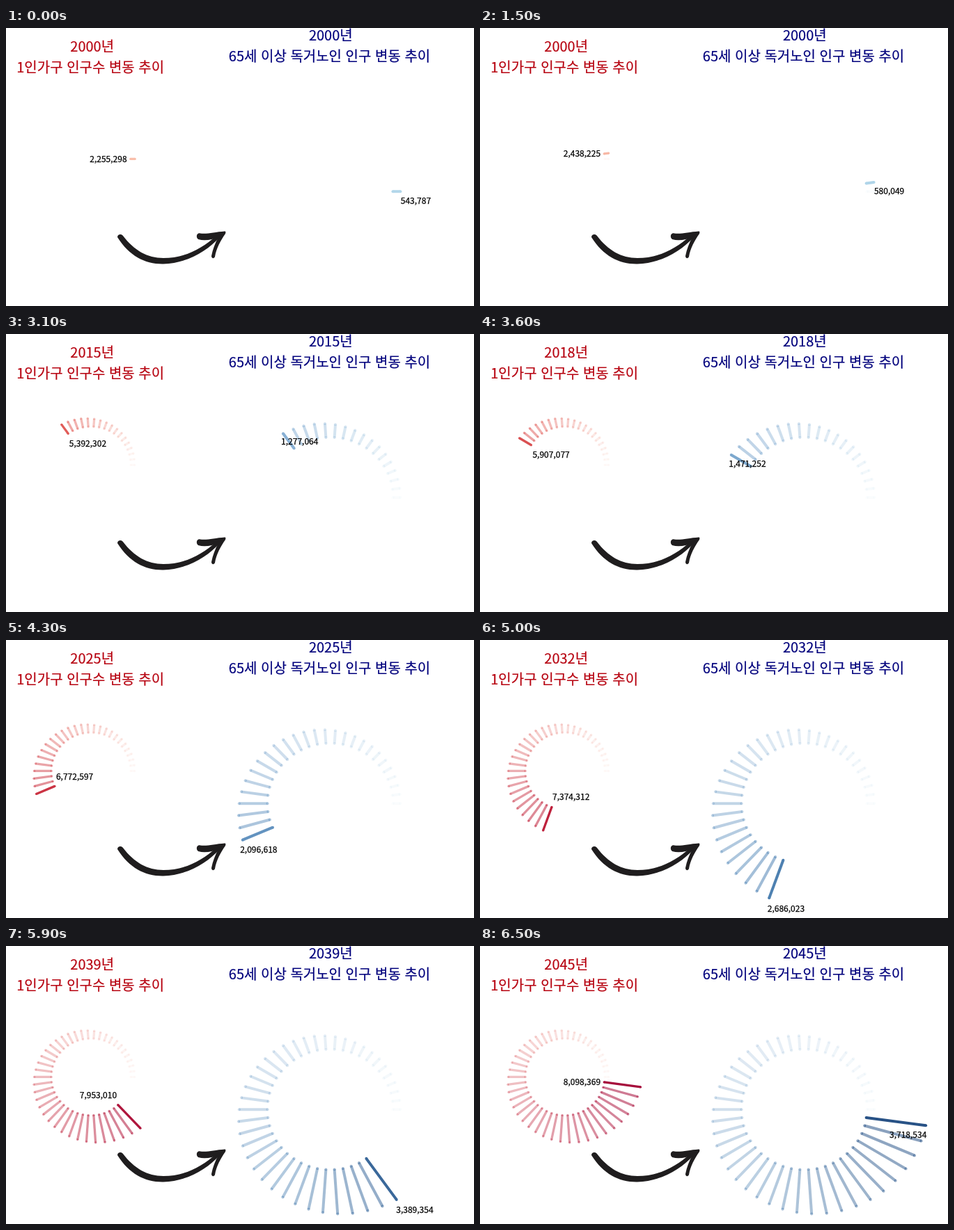
An HTML page for the animation above (8 s loop, 672x400 px).

```html
<!DOCTYPE html>
<html lang="ko">
<head>
<meta charset="utf-8">
<style>
html, body { margin: 0; width: 100%; height: 100%; overflow: hidden; background: #fff; }
svg { display: block; width: 672px; height: 400px; }
text {
  font-family: "Noto Sans CJK KR", "Noto Sans KR", "Noto Sans CJK JP", "Noto Sans CJK SC",
    "Noto Sans CJK TC", "Noto Sans CJK HK", "Noto Sans CJK", "Noto Sans", sans-serif;
}
.title { font-size: 20px; text-anchor: middle; stroke-width: 0.2px; }
.value { font-size: 12px; fill: #000; stroke: #000; stroke-width: 0.25px; }
</style>
</head>
<body>
<svg viewBox="0 0 672 400">
  <g class="title" fill="#b70411" stroke="#b70411">
    <text class="year" x="123.7" y="34">2000년</text>
    <text x="121.2" y="63.5">1인가구 인구수 변동 추이</text>
  </g>
  <g class="title" fill="#00007c" stroke="#00007c">
    <text class="year" x="466.3" y="18">2000년</text>
    <text x="464.5" y="48">65세 이상 독거노인 인구 변동 추이</text>
  </g>
  <g id="charts"></g>
  <g fill="#1f1d1e">
    <path d="M160,301 C177,328 200,340 226,339.5 C258,338.5 287,323 308,300 L303,298 C280,319 255,331 226,331 C203,331 184,320 168,299 C165,295.5 160,297 160,301Z"/>
    <path d="M314,292.5 C300,293.5 288,297 279,295.5 C274,294 272,301 276,304 C286,307 297,304 305,301 C300,310 297,318 295,328 C295,332 299,332 300,329 C302,317 308,306 315,296 C316,293 315,292 314,292.5Z"/>
  </g>
  <g id="labels"></g>
</svg>
<script>
const NS = "http://www.w3.org/2000/svg";
const COUNT = 46, LOOP = 8000, HOLD = 1500, TICK = 100, LAST = 51;
const pauses = [5, 19, 21, 36, 41, 51]; // ticks on which the bars wait for the year

function add(parent, tag, attrs = {}) {
  const el = document.createElementNS(NS, tag);
  set(el, attrs);
  return parent.appendChild(el);
}

function set(el, attrs) {
  for (const key in attrs) el.setAttribute(key, attrs[key]);
}

// Smooth curve through [x, y] points.
function curve(pts, x) {
  const last = pts.length - 1;
  let i = 0;
  while (i < last - 1 && x > pts[i + 1][0]) i++;
  const slope = n => {
    const a = pts[Math.max(0, n - 1)], b = pts[Math.min(last, n + 1)];
    return (b[1] - a[1]) / (b[0] - a[0]);
  };
  const [x0, y0] = pts[i], [x1, y1] = pts[i + 1];
  const w = x1 - x0, u = (x - x0) / w, v = 1 - u;
  return y0 * (1 + 2 * u) * v * v + slope(i) * w * u * v * v +
         y1 * u * u * (3 - 2 * u) - slope(i + 1) * w * u * u * v;
}

// Colour at u (0 to 1) along evenly spaced hex stops.
function blend(stops, u) {
  const pos = u * (stops.length - 1), i = Math.min(stops.length - 2, Math.floor(pos));
  const channel = (hex, n) => parseInt(hex.slice(1 + 2 * n, 3 + 2 * n), 16);
  return `rgb(${[0, 1, 2].map(n => {
    const a = channel(stops[i], n), b = channel(stops[i + 1], n);
    return Math.round(a + (b - a) * (pos - i));
  })})`;
}

// Bars grow slowly at first, then almost evenly.
const growth = u => u - 0.95 * u * (1 - u) ** 2;

const single = {
  cx: 122, cy: 188.4, stretch: 1.03, width: 3.3, inner: 53.5, first: 63, final: 108,
  values: [[0, 2255298], [1, 2438225], [10, 4174073], [19, 5907077], [32, 7374312], [40, 7953010], [45, 8098369]],
  colors: ["#f9beaa", "#e3605a", "#c2243c", "#a60e3c"],
  // Inside the ring, next to the inner end of the bar.
  place(c, s) {
    const level = Math.abs(s) < 0.2, end = c > -0.1;
    const gap = level ? 3.5 : 0.5;
    return {
      x: this.cx + c * this.inner * this.stretch + (end ? -gap : gap),
      y: this.cy - s * this.inner + (level ? 0 : Math.sign(s) * 12.8) + 4.3,
      "text-anchor": end ? "end" : "start"
    };
  }
};

const senior = {
  cx: 465.5, cy: 235.2, stretch: 1.04, width: 4, inner: 84.5, first: 99, final: 171.5,
  values: [[0, 543787], [1, 580049], [10, 991135], [19, 1471252], [32, 2686023], [39, 3389354], [45, 3718534]],
  colors: ["#b3d7ea", "#8cb3d6", "#5488b8", "#285286"],
  // Below the outer end of the bar.
  place(c, s, r) {
    return {
      x: Math.min(this.cx + c * r * this.stretch - 1.7, 588),
      y: this.cy - s * r + 17.6
    };
  }
};

function build(chart) {
  const { cx, cy, stretch, width, inner, first, final } = chart;
  const root = add(document.getElementById("charts"), "g");
  chart.bars = [];
  for (let i = 0; i < COUNT; i++) {
    const angle = i * 2 * Math.PI / COUNT, c = Math.cos(angle), s = Math.sin(angle);
    const u = i / (COUNT - 1), r = first + (final - first) * growth(u);
    const color = blend(chart.colors, u);
    const at = d => [cx + c * d * stretch, cy - s * d];
    const [x1, y1] = at(inner + width / 2), [x2, y2] = at(r - width / 2);
    const g = add(root, "g", { fill: color, stroke: color });
    const line = add(g, "line", { x1, y1, x2, y2, "stroke-width": width });
    const dots = [[x1, y1], [x2, y2]].map(([x, y]) =>
      add(g, "circle", { cx: x, cy: y, r: width / 2, stroke: "none" }));
    chart.bars.push({ g, parts: [line, ...dots], label: chart.place(c, s, r) });
  }
  chart.text = add(document.getElementById("labels"), "text", { class: "value" });
}

function show(chart, now) {
  chart.bars.forEach(({ g, parts }, i) => {
    g.setAttribute("display", i > now ? "none" : "inline");
    const alpha = i === now ? 1 : 0.06 + 0.5 * i / now;
    if (i <= now) parts.forEach(p => p.setAttribute("opacity", alpha));
  });
  set(chart.text, chart.bars[now].label);
  chart.text.textContent = Math.round(curve(chart.values, now)).toLocaleString("en-US");
}

const years = document.querySelectorAll(".year");
const step = tick => tick <= 0 ? 0 : tick - pauses.filter(p => p <= tick).length;
let shown = -1;

function draw(ms) {
  const t = ms % LOOP;
  const tick = t < HOLD ? 0 : Math.min(LAST, Math.floor((t - HOLD) / TICK) + 1);
  if (tick === shown) return;
  shown = tick;
  show(single, step(tick));
  show(senior, step(tick < 45 ? tick : tick - 1)); // falls one tick behind near the end
  years.forEach(el => el.textContent = 2000 + step(tick - 1) + "년");
}

build(single);
build(senior);
draw(0);
const start = performance.now();
requestAnimationFrame(function loop() {
  draw(performance.now() - start);
  requestAnimationFrame(loop);
});
</script>
</body>
</html>
```
